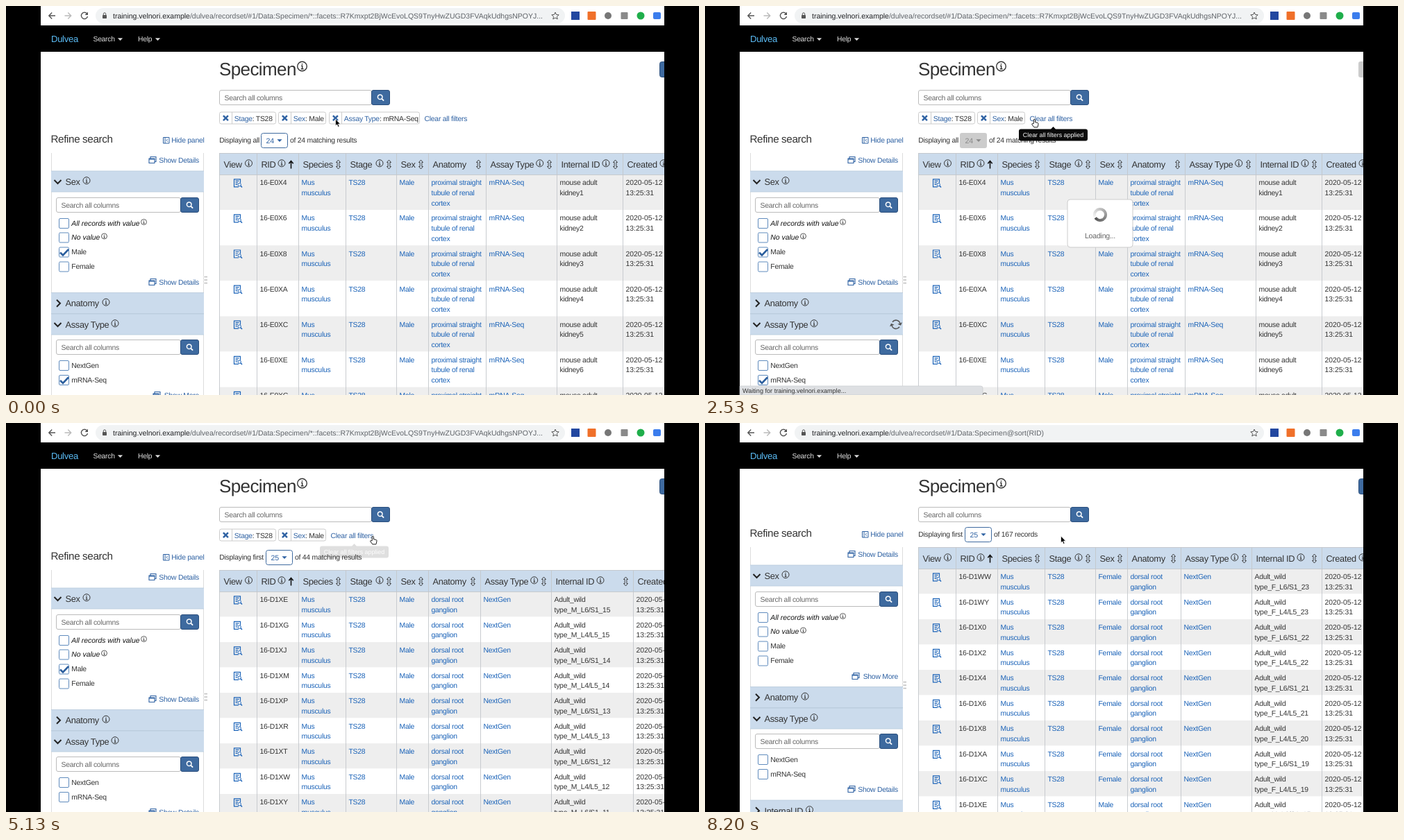
Write an HTML page that moves like this. It is 998 px wide and 561 px high and loops after 9.47 s.

```html
<!DOCTYPE html>
<html lang="en">
<head>
<meta charset="utf-8">
<title>Specimen filters</title>
<style>
html, body { margin: 0; width: 100%; height: 100%; overflow: hidden; background: #000; }
svg { display: block; width: 998px; height: 561px; }
text { font-family: "Liberation Sans", Arial, sans-serif; letter-spacing: -.0235em; text-rendering: geometricPrecision; white-space: pre; }
text.n { letter-spacing: 0; }
</style>
</head>
<body>
<svg viewBox="0 0 998 561" xmlns="http://www.w3.org/2000/svg">
  <g id="page"></g>
  <path d="M0 0H50V561H0zM948 0H998V561H948z"/>
  <g id="status">
    <path d="M50 548H397q3 0 3 3V561H50z" fill="#dee0e3" stroke="#c4c6c9" stroke-width=".6"/>
    <text class="n" x="54" y="558" font-size="9.1" fill="#333">Waiting for training.velnori.example...</text>
  </g>
  <g id="tips"></g>
  <g id="cursor">
    <path id="arrow" d="M0 0v9.8l2.2-2 1.6 3.6 1.7-.7-1.6-3.5h3.1z" stroke="#fff" stroke-width=".7"/>
    <path id="hand" d="M-1.2 6.6V1.4a1.1 1.1 0 0 1 2.2 0v3.2l3.4.8c.9.2 1.2.8 1.1 1.7l-.5 3-.6 1.8h-5l-3-4c-.6-.9.3-1.8 1.1-1.1z" fill="#fff" stroke="#000" stroke-width=".9"/>
  </g>
</svg>
<script>
const LOOP = 9470, INK = '#333', LINK = '#1b63b8', UI = '#2f62a3', BTN = '#3e6a9f', EDGE = '#2b4f7d', HEAD = '#cbdbec';
const $ = id => document.getElementById(id);

const text = (x, y, s, fill = INK, size = 10.4, more = '') =>
  `<text x="${x}" y="${y}" fill="${fill}" font-size="${size}" ${more}>${s}</text>`;
const rect = (x, y, w, h, fill, more = '') =>
  `<rect x="${x}" y="${y}" width="${w}" height="${h}" fill="${fill}" ${more}/>`;
const line = (d, color, w = 1, more = '') =>
  `<path d="${d}" fill="none" stroke="${color}" stroke-width="${w}" ${more}/>`;
const at = (x, y, s) => `<g transform="translate(${x} ${y})">${s}</g>`;
const box = (x, y, w, h, fill = '#fff', stroke = '#bbb', r = 2.5) =>
  rect(x + .5, y + .5, w - 1, h - 1, fill, `stroke="${stroke}" rx="${r}"`);

const info = (x, y, r = 5) => at(x, y,
  `<circle r="${r}" fill="none" stroke="${INK}" stroke-width="${r / 5}"/>` +
  line(`M0 ${-r * .6}v${r * .25}M${-r * .2} ${-r * .1}h${r * .22}V${r * .55}m${-r * .28} 0h${r * .56}`, INK, r * .22));
const caret = (x, y, fill) => `<path d="M${x - 3.6} ${y - 1.8}h7.2l-3.6 3.8z" fill="${fill}"/>`;
const lens = (x, y) => at(x, y, line('M1.6 1.6L4.6 4.6', '#fff', 1.9) + '<circle cx="-.8" cy="-.8" r="3.3" fill="none" stroke="#fff" stroke-width="1.5"/>');
const sort = (x, y) => at(x, y, line('M0-6.5l3 3.5h-1.6v6h1.6l-3 3.5-3-3.5h1.6v-6h-1.6z', INK, .9));
const viewIcon = (x, y) => at(x, y,
  line('M1 5.5H-5.5V-5.5H3.5V0M-3.5-3H1.5M-3.5-.5H0M-3.5 2H-1', LINK, 1.2) +
  `<circle cx="2.2" cy="2.4" r="2.2" fill="#fff" stroke="${LINK}"/>` + line('M3.8 4L6 6.3', LINK, 1.5));
const refresh = y => at(275, y, '<g class="spin">' +
  line('M-6-1.2A6.1 6.1 0 0 1 4.6-4M6 1.2A6.1 6.1 0 0 1-4.6 4', '#555', 1.6) +
  '<path d="M7-6.4v5H2zM-7 6.4v-5H-2z" fill="#555"/></g>');

const search = (x, y, w) => box(x, y, w, 22) + text(x + 7.5, y + 14.5, 'Search all columns', '#666') +
  box(x + w - 1, y, 27, 22, BTN, EDGE) + lens(x + w + 12.5, y + 11);

const check = (y, label, on) => rect(76.5, y - 7, 14, 14, '#fff', 'stroke="#5f8bbd" rx="1.5"') +
  (on ? line(`M78 ${y + .5}l4 4 8-8.5`, '#2c5f9e', 2.6) : '') + text(94.3, y + 3.3, label);
const special = (y, label, end) => check(y, '', false) +
  text(94.3, y + 3.1, label, '#111', 10.4, 'class="n" font-style="italic"') + info(end, y - 2, 4);

const showLink = (y, word) => {
  const x = word === 'More' ? 217 : 211;
  return line(`M${x - 3} ${y - 2.5}v-2h8v7h-2M${x - 5} ${y - 2}h8v6.5h-8zM${x - 5} ${y - 1}h8`, UI, 1.1) +
    text(278, y + 3.7, 'Show ' + word, UI, 10.4, 'text-anchor="end"');
};

const facetHead = (y, label, end, open, busy) => rect(65, y - 15, 220, 30, HEAD) +
  line(`M65 ${y - 15}H285M65 ${y + 15}H285`, '#b7c9db', .8) +
  line(open ? `M69.5 ${y - 2}l5 5 5-5` : `M73 ${y - 4.7}l5 5-5 5`, '#222', 2) +
  text(85.5, y + 4.7, label, INK, 12.8) + info(end, y - 1.3) + (busy ? refresh(y + .3) : '');

function facets(o) {
  return line('M65.5 212V600M284.5 212V600', '#ddd') +
    showLink(222, 'Details') +
    facetHead(253, 'Sex', 116, true, o.busySex) + search(72, 276, 180) +
    special(313.5, 'All records with value', 198.5) + special(334, 'No value', 141.5) +
    check(355, 'Male', o.male) + check(376, 'Female') + showLink(398, o.sexShow || 'Details') +
    facetHead(428.5, 'Anatomy', 144, false) +
    facetHead(459, 'Assay Type', 157, true, o.busyAssay) + search(72, 481, 180) +
    check(518.5, 'NextGen') + check(539.5, 'mRNA-Seq', o.mrna) + showLink(561, o.assayShow || 'Details') +
    facetHead(592, 'Internal ID', 150.5, false);
}

const wild = (sex, k, top) => ['Adult_wild', `type_${sex}_${k % 2 ? 'L4/L5' : 'L6/S1'}_${top - (k >> 1)}`];
const ganglion = ['dorsal root', 'ganglion'];
const sets = {
  kidney: {
    cols: [691, 793, 888], h: 51.1, ids: 'E0X4 E0X6 E0X8 E0XA E0XC E0XE E0XG',
    row: i => ['Male', ['proximal straight', 'tubule of renal', 'cortex'], 'mRNA-Seq', ['mouse adult', 'kidney' + (i + 1)]]
  },
  male: {
    cols: [683, 785, 903], h: 36.5, ids: 'D1XE D1XG D1XJ D1XM D1XP D1XR D1XT D1XW D1XY D1Y0',
    row: i => ['Male', ganglion, 'NextGen', wild('M', i, 15)]
  },
  all: {
    cols: [685, 787, 888], h: 36.5, ids: 'D1WW D1WY D1X0 D1X2 D1X4 D1X6 D1X8 D1XA D1XC D1XE',
    row: i => i > 8 ? sets.male.row(0) : ['Female', ganglion, 'NextGen', wild('F', i > 5 ? i + 1 : i, 23)]
  }
};

function table(name) {
  const { cols, h, ids, row } = sets[name];
  const [assay, inner, made] = cols;
  const xs = [307, 361, 421, 489, 562, 608, assay, inner, made];
  let out = rect(307, 212, 660, 31, HEAD);
  ids.split(' ').forEach((id, i) => {
    const y = 243 + i * h;
    const [sex, part, kind, label] = row(i);
    out += rect(307, y, 660, h, i % 2 ? '#fff' : '#eee') + viewIcon(334, y + 12.3);
    [['16-' + id], ['Mus', 'musculus'], ['TS28'], [sex], part, [kind], label, ['2020-05-12', '13:25:31']]
      .forEach((cell, c) => cell.forEach((s, n) => {
        out += text(xs[c + 1] + 4.5, y + 15.3 + n * 14.6, s, c > 0 && c < 6 ? LINK : INK, 10.4, c === 7 ? 'class="n"' : '');
      }));
  });
  out += line(xs.map(x => `M${x + .5} 212V620`).join('') + 'M307 212.5H960M307 243.5H960', '#c3c7cb', .9);
  ['View', 'RID', 'Species', 'Stage', 'Sex', 'Anatomy', 'Assay Type', 'Internal ID', 'Created']
    .forEach((s, c) => { out += text(xs[c] + 6.4, 232.7, s, INK, 12.8); });
  [349.5, 397, 538, assay + 77.7, inner + 71, made + 59].forEach(x => { out += info(x, 226.8); });
  xs.slice(3).forEach(x => { out += sort(x - 10.5, 228.5); });
  return out + line('M410.5 234.5V224m-3.2 3.3l3.2-3.8 3.2 3.8', '#111', 1.6);
}

const chip = (x, w, key, value) => box(x, 152.5, w, 18, '#fff', '#ccc') +
  line(`M${x + 18.5} 153v17`, '#ccc') + line(`M${x + 5.9} 158.2l7 7m0-7l-7 7`, UI, 2.5) +
  text(x + 21.8, 165.5, `${key}<tspan fill="${INK}">: ${value}</tspan>`, UI);

function filters(n) {
  if (!n) return '';
  return chip(307, 82, 'Stage', 'TS28') + chip(392, 69, 'Sex', 'Male') +
    (n > 2 ? chip(465, 131, 'Assay Type', 'mRNA-Seq') : '') +
    text(n > 2 ? 602.5 : 467.5, 165.5, 'Clear all filters', UI);
}

function summary(o) {
  const x = o.first ? 374 : 367, ink = o.load ? '#888' : UI;
  return text(307.3, 197, o.first ? 'Displaying first' : 'Displaying all') +
    (o.load ? rect(x, 183, 39, 22, '#ccc', 'rx="3"') : box(x, 183, 39, 22, '#fff', BTN, 3)) +
    text(x + 7.5, 197.7, o.first ? 25 : 24, ink, 10.6) + caret(x + 27, 194, ink) + text(x + 42, 197, o.count);
}

function toolbar(short) {
  const rest = short ? '@sort(RID)' : '/*::facets::R7Kmxpt2BjWcEvoLQS9TnyHwZUGD3FVAqkUdhgsNPOYJ...';
  return rect(50, 0, 898, 28, '#fff') + rect(129, 3, 676, 22, '#f1f3f4', 'rx="11"') +
    line('M71 14H62m4.2-4.4L61.8 14l4.4 4.4', '#555', 1.4) + line('M84.5 14h9m-4.2-4.4l4.4 4.4-4.4 4.4', '#bbb', 1.4) +
    line('M116.6 11A4.6 4.6 0 1 0 117.5 15', '#555', 1.4) + '<path d="M118 8.5v4.5h-4.5z" fill="#555"/>' +
    rect(139, 13, 6, 5, '#555', 'rx=".7"') + line('M140.3 13v-1.5a1.7 1.7 0 0 1 3.4 0V13', '#555') +
    text(154, 17.8, `training.velnori.example<tspan fill="#5f6368">/dulvea/recordset/#1/Data:Specimen${rest}</tspan>`, '#202124', 10.5, 'class="n"') +
    line('M791 9l1.5 3.4 3.7.4-2.8 2.5.8 3.6-3.2-1.9-3.2 1.9.8-3.6-2.8-2.5 3.7-.4z', '#555') +
    rect(814, 8, 12, 12, '#2348a0') + rect(837.5, 8, 12, 12, '#f0702a', 'rx="1"') +
    '<circle cx="867" cy="14" r="5" fill="#777"/>' + rect(885.5, 9, 10, 10, '#8a8a8a', 'rx="1"') +
    '<circle cx="914" cy="14" r="5.5" fill="#1fae4b"/>' + rect(932, 9, 11, 10, '#3b7ded', 'rx="2"') +
    rect(50, 28, 898, 38, '#000') + text(65, 51.5, 'Dulvea', '#5bbcf5', 13.1) +
    text(125.5, 51, 'Search', '#ddd', 10.3) + caret(164.5, 48, '#ddd') + text(190, 51, 'Help', '#ddd', 10.3) + caret(218.5, 48, '#ddd');
}

function loading() {
  const n = 24, p = a => `${8 * Math.cos(a)} ${8 * Math.sin(a)}`;
  let ring = '';
  for (let i = 0; i < n; i++) {
    const a = i / n * 2 * Math.PI + 1.7;
    ring += line(`M${p(a)}A8 8 0 0 1 ${p(a + .29)}`, `hsl(0 0% ${97 - 68 * i / n}%)`, 4);
  }
  return box(521.5, 278.5, 95, 70, '#fff', '#ccc', 4) + at(569, 301, `<g class="ring">${ring}</g>`) +
    text(569, 335, 'Loading...', '#666', 10.6, 'text-anchor="middle"');
}

const grip = y => [-5.2, -.7, 3.8].map(d => rect(286, y + d, 1.3, 1.6, '#999') + rect(288.3, y + d, 1.3, 1.6, '#999')).join('');

function page(o) {
  const dy = o.chips ? 0 : -33;
  return rect(50, 0, 898, 561, '#fff') +
    text(307, 100.3, 'Specimen', INK, 26) + info(426.5, 87, 6.8) +
    (o.load ? rect(941, 80, 20, 23, '#ccc', 'rx="3"') : box(941, 80, 20, 23, BTN, EDGE, 3)) +
    search(307, 121, 220) + filters(o.chips) +
    at(0, dy, text(64.5, 197.3, 'Refine search', INK, 15.2) +
      line('M226.5 189.5h8.5v8.5h-8.5zM229 189.5v8.5M233 191.7l-2 2 2 2', UI) + text(238.3, 197, 'Hide panel', UI) +
      summary(o) + facets(o) + table(o.data)) +
    grip(o.grip) + (o.cut ? rect(50, 530, 898, 31, '#fff') : '') + toolbar(o.short) + (o.load ? loading() : '');
}

// Each state adds to the one before it.
const states = [
  { from: 0, data: 'kidney', chips: 3, male: true, mrna: true, assayShow: 'More', count: 'of 24 matching results', grip: 395, since: 0 },
  { from: 1400, chips: 2, load: true, busyAssay: true, since: 1400 },
  { from: 3400, data: 'male', load: false, busyAssay: false, mrna: false, assayShow: 'Details', first: true, count: 'of 44 matching results' },
  { from: 6400, chips: 0, load: true, busySex: true, busyAssay: true, count: 'of 44 records', cut: true, grip: 362, since: 6400 },
  { from: 6530, cut: false, grip: 378 },
  { from: 6600, short: true },
  { from: 7870, data: 'all', load: false, count: 'of 167 records' },
  { from: 8050, male: false, busySex: false, sexShow: 'More' },
  { from: 8190, busyAssay: false }
];
for (let i = 1; i < states.length; i++) states[i] = { ...states[i - 1], ...states[i] };

const tip = (x, y, w, s) => `<g opacity="0"><path d="M${x - 3.7} ${y + .5}l3.7-4 3.7 4z"/>` +
  rect(x - w / 2, y, w, 17, '#0a0a0a', 'rx="3"') + text(x, y + 11.2, s, '#fff', 8.9, 'class="n" text-anchor="middle"') + '</g>';
$('tips').innerHTML = tip(474, 176, 84, 'Clear filter applied') + tip(501.5, 177.5, 99, 'Clear all filters applied');

const ramp = (t, a, b) => Math.max(0, Math.min(1, (t - a) / (b - a)));
const path = [[0, 474.5, 163], [3400, 474.5, 163], [3530, 482, 162], [3800, 553.5, 158.5], [4050, 582, 161.5],
  [4730, 582, 161.5], [5130, 528.5, 163], [5500, 512.5, 163], [LOOP, 512.5, 163]];

function pointer(t) {
  const i = path.findIndex(k => k[0] > t), a = path[i - 1], b = path[i], k = ramp(t, a[0], b[0]);
  return [a[1] + (b[1] - a[1]) * k, a[2] + (b[2] - a[2]) * k];
}

let current = null;
function draw(t) {
  const state = states.filter(s => s.from <= t).pop();
  if (state !== current) $('page').innerHTML = page(current = state);

  const turn = (name, ms) => document.querySelectorAll(name)
    .forEach(el => el.setAttribute('transform', `rotate(${(t - state.since) / ms * 360})`));
  turn('.ring', 1000);
  turn('.spin', 2000);

  const [one, two] = $('tips').children;
  one.setAttribute('opacity', t < 1400 ? ramp(t, 530, 730) : 0);
  two.setAttribute('opacity', t < 4700 ? ramp(t, 1470, 1670) * (1 - ramp(t, 3770, 4030)) : t < 6400 ? ramp(t, 5110, 5280) : 0);
  $('status').style.display = (t >= 2400 && t < 3400) || (t >= 7330 && t < 7870) ? '' : 'none';

  const [x, y] = pointer(t);
  const over = t >= 530 && t < 6400 && x < 530;
  $('cursor').setAttribute('transform', `translate(${x} ${y})`);
  $('hand').style.display = over ? '' : 'none';
  $('arrow').style.display = over ? 'none' : '';
}

const start = performance.now();
function tick() {
  draw((performance.now() - start) % LOOP);
  requestAnimationFrame(tick);
}
tick();
</script>
</body>
</html>
```
